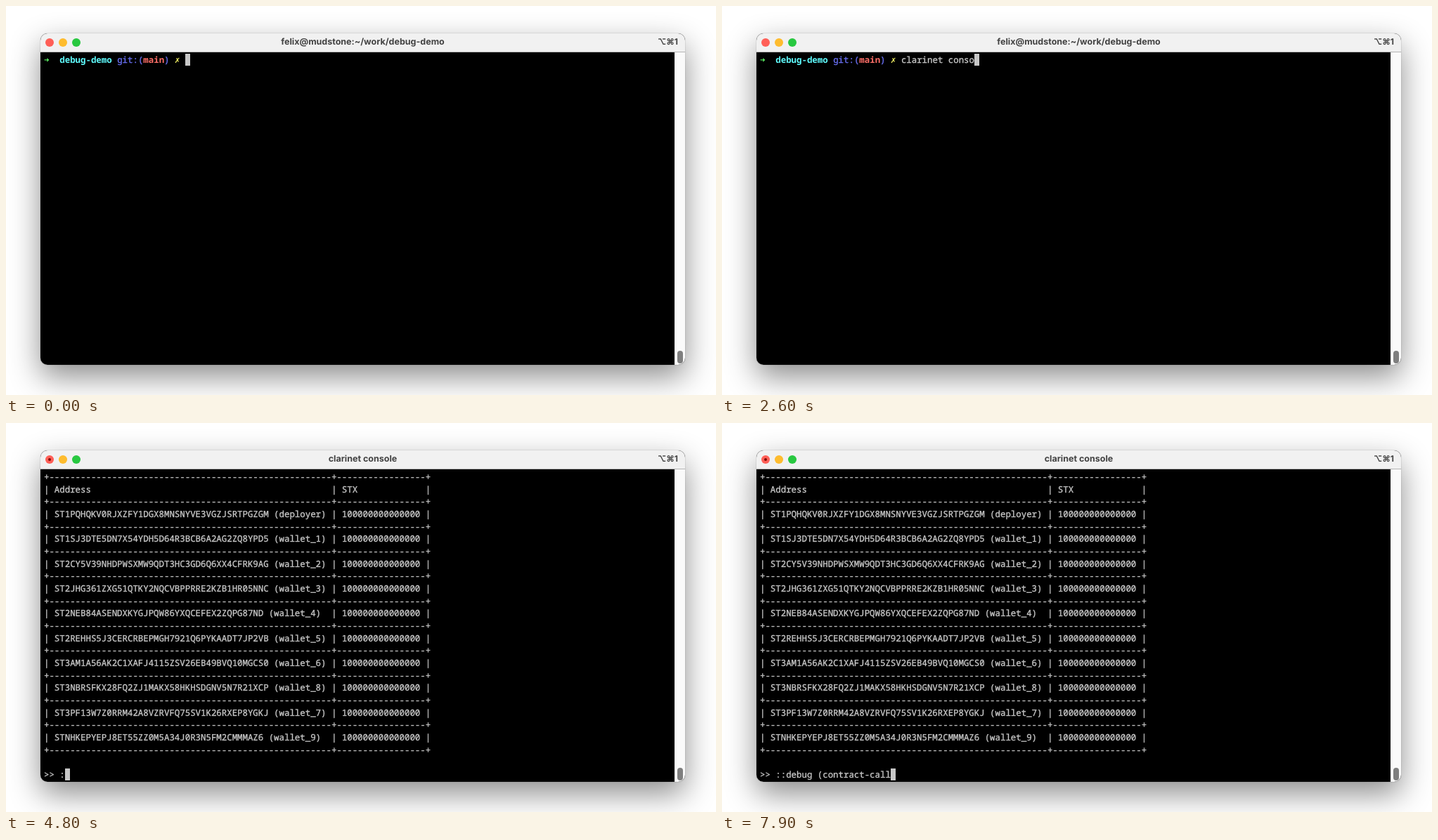
Recreate the animation shown at these times as an HTML page. Size 1010 by 554 pixels, loop 8 s.

```html
<!DOCTYPE html>
<html lang="en">
<head>
<meta charset="utf-8">
<title>Terminal session</title>
<style>
html, body { margin: 0; width: 100%; height: 100%; overflow: hidden; background: #fff; }
body { position: relative; }
#win, #shadow {
  position: absolute; left: 49px; top: 39px; width: 917px; height: 472px; border-radius: 10px;
}
#win { overflow: hidden; background: #000; }
#shadow { box-shadow: 0 0 1px rgba(0,0,0,.7), 0 17px 44px rgba(0,0,0,.45); }
#bar {
  position: absolute; left: 0; top: 0; width: 100%; height: 26px;
  background: #f1f1f1; border-bottom: 1px solid #b4b4b4;
  font: 700 12.5px/25px Inter, "DejaVu Sans", sans-serif; color: #424242;
  text-rendering: geometricPrecision;
}
#title { position: absolute; width: 100%; text-align: center; }
#tab { position: absolute; right: 10px; top: -1px; font-size: 12px; }
.light { position: absolute; top: 6.8px; width: 12px; height: 12px; border-radius: 50%; }
#dot {
  position: absolute; left: 4px; top: 4px; width: 4px; height: 4px;
  border-radius: 50%; background: #7d0b06;
}
#track { position: absolute; right: 0; top: 27px; width: 15px; bottom: 0; background: #fafafa; }
#thumb { position: absolute; left: 4px; bottom: 2.5px; width: 8px; height: 17.5px; border-radius: 4px; background: #7f7f7f; }
#term {
  position: absolute; left: 5px; top: 29px;
  font: 500 12.4px/17.67px "Noto Sans Mono", "DejaVu Sans Mono", monospace;
  color: #c7c7c7; -webkit-text-stroke: .35px;
  font-variant-ligatures: none; text-rendering: geometricPrecision;
}
#term span { position: absolute; white-space: pre; }
#term .cursor { width: 7.44px; height: 17.3px; background: #c7c7c7; }
.b { font-weight: 700; -webkit-text-stroke: 0; }
.green { color: #5ffa68; }
.cyan { color: #60fdff; }
.blue { color: #6a71f6; }
.red { color: #ff6e67; }
.yellow { color: #fffc67; }
.dim { color: #767676; }
</style>
</head>
<body>
<div id="shadow"></div>
<div id="win">
  <div id="bar">
    <div class="light" style="left:7.4px;background:#ff5f57"><div id="dot"></div></div>
    <div class="light" style="left:26px;background:#febc2e"></div>
    <div class="light" style="left:44.5px;background:#28c840"></div>
    <div id="title"></div>
    <div id="tab">⌥⌘1</div>
  </div>
  <div id="term"></div>
  <div id="track"><div id="thumb"></div></div>
</div>
<script>
const LOOP = 8000, CW = 7.44, RH = 17.67;
const $ = id => document.getElementById(id);

// [time, characters typed]
const shellKeys = [[1500, 2], [1600, 3], [1700, 5], [1800, 7], [1900, 8], [2000, 9], [2200, 10],
  [2300, 11], [2400, 12], [2500, 13], [2600, 14], [2800, 16]];
const replKeys = [[4800, 1], [4900, 2], [5100, 3], [5300, 4], [5400, 5], [5500, 7], [5700, 8],
  [6300, 9], [6500, 10], [6600, 11], [6700, 12], [6800, 13], [6900, 14], [7000, 15], [7100, 16],
  [7300, 17], [7500, 18], [7600, 19], [7700, 20], [7900, 22]];

const wallets = [
  "ST1PQHQKV0RJXZFY1DGX8MNSNYVE3VGZJSRTPGZGM (deployer)",
  "ST1SJ3DTE5DN7X54YDH5D64R3BCB6A2AG2ZQ8YPD5 (wallet_1)",
  "ST2CY5V39NHDPWSXMW9QDT3HC3GD6Q6XX4CFRK9AG (wallet_2)",
  "ST2JHG361ZXG51QTKY2NQCVBPPRRE2KZB1HR05NNC (wallet_3)",
  "ST2NEB84ASENDXKYGJPQW86YXQCEFEX2ZQPG87ND (wallet_4)",
  "ST2REHHS5J3CERCRBEPMGH7921Q6PYKAADT7JP2VB (wallet_5)",
  "ST3AM1A56AK2C1XAFJ4115ZSV26EB49BVQ10MGCS0 (wallet_6)",
  "ST3NBRSFKX28FQ2ZJ1MAKX58HKHSDGNV5N7R21XCP (wallet_8)",
  "ST3PF13W7Z0RRM42A8VZRVFQ75SV1K26RXEP8YGKJ (wallet_7)",
  "STNHKEPYEPJ8ET55ZZ0M5A34J0R3N5FM2CMMMAZ6 (wallet_9)"
];

const put = (row, col, text, cls = "") =>
  `<span class="${cls}" style="left:${col * CW}px;top:${row * RH}px">${text}</span>`;
const cursor = (row, col) => put(row, col, "", "cursor");
const typed = (text, keys, t) =>
  text.slice(0, keys.reduce((n, [at, count]) => t >= at ? count : n, 0));

function shell(t) {
  const cmd = typed("clarinet console", shellKeys, t);
  const out = put(0, 0, "➜", "b green") + put(0, 3, "debug-demo", "b cyan") +
    put(0, 14, "git:(", "blue") + put(0, 19, "main", "b red") + put(0, 23, ")", "blue") +
    put(0, 25, "✗", "b yellow") + put(0, 27, cmd);
  if (t < 3200) return out + cursor(0, 27 + cmd.length);
  if (t < 3300) return out + cursor(1, 0);
  return out + put(2, 0, "clarity-repl v0.24.0", "b green") +
    put(3, 0, 'Enter "::help" for usage hints.', "dim") +
    put(4, 0, "Connected to a transient in-memory database.", "dim") + cursor(5, 0);
}

const rule = `+${"-".repeat(54)}+${"-".repeat(17)}+`;
const line = (a, b) => `| ${a.padEnd(53)}| ${b.padEnd(16)}|`;
const table = [line("Address", "STX"), ...wallets.map(w => line(w, "100000000000000"))]
  .map((s, i) => put(2 * i, 0, rule) + put(2 * i + 1, 0, s)).join("") + put(22, 0, rule);

function repl(t) {
  const cmd = typed("::debug (contract-call", replKeys, t);
  return table + put(24, 0, "&gt;&gt; " + cmd) + cursor(24, 3 + cmd.length);
}

let last = "";
function frame(now) {
  const t = now % LOOP;
  const html = t < 3400 ? shell(t) : repl(t);
  if (html !== last) $("term").innerHTML = last = html;
  $("title").textContent = t < 3200 ? "felix@mudstone:~/work/debug-demo" : "clarinet console";
  $("dot").style.display = t < 4000 ? "none" : "block";
  requestAnimationFrame(frame);
}
frame(0);
</script>
</body>
</html>
```
